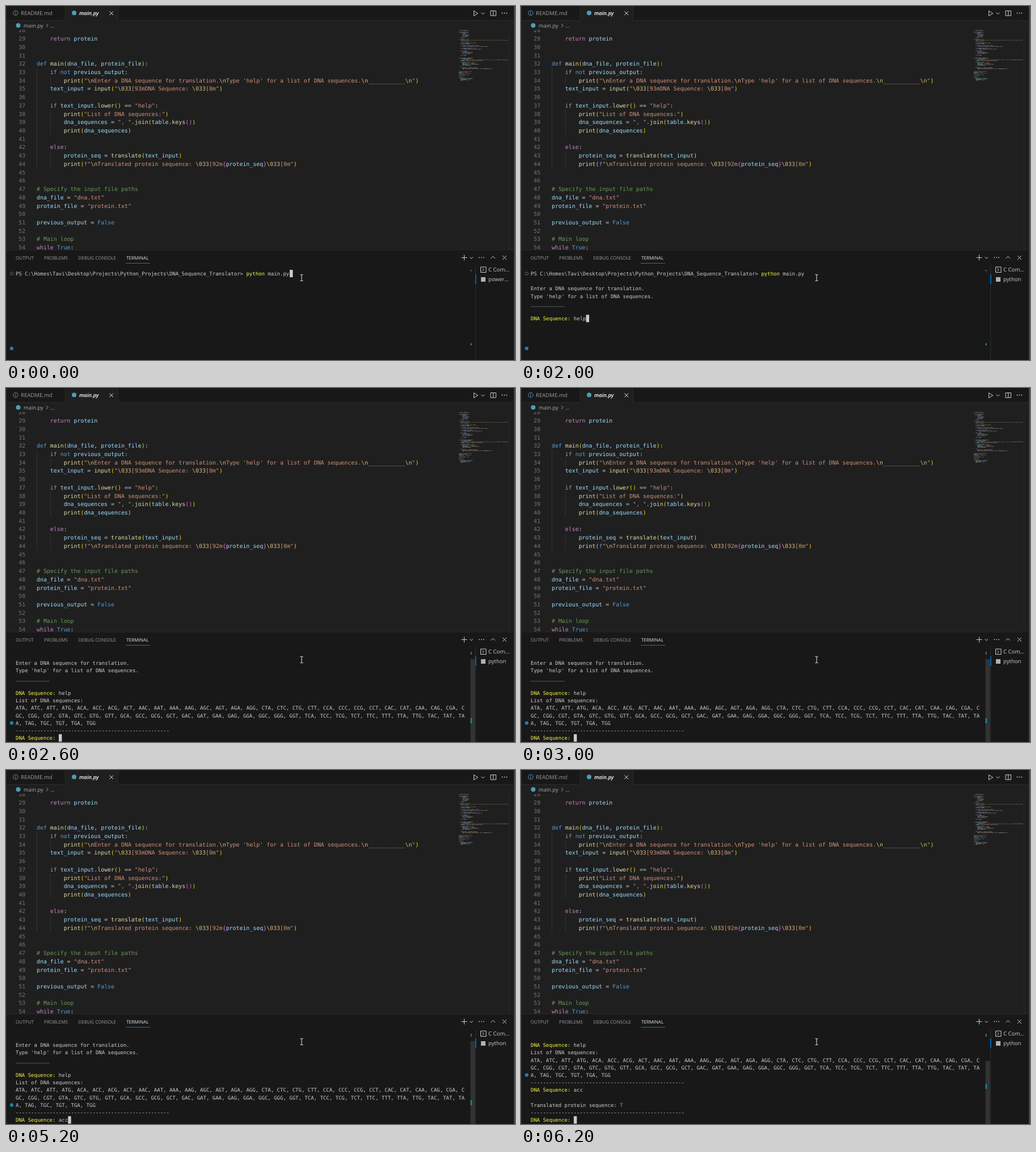
Recreate the animation shown at these times as an HTML page. Size 897 px wide and 624 px high, loop 6.4 s.

```html
<!DOCTYPE html>
<html lang="en">
<head>
<meta charset="utf-8">
<title>DNA translator session</title>
<style>
  html, body { margin: 0; width: 100%; height: 100%; overflow: hidden; background: #1f1f1f; }
  svg { display: block; }
  text { white-space: pre; text-rendering: geometricPrecision; }
  .code { font: 9.906px "DejaVu Sans Mono", monospace; }
  .term { font: 9.014px "DejaVu Sans Mono", monospace; }
  .ui { font: 9.6px "Open Sans", sans-serif; }
  .tab { font: 8.15px "Open Sans", sans-serif; }
  .icon { fill: none; stroke: #cccccc; stroke-width: 1; }
</style>
</head>
<body>
<svg id="stage" width="897" height="624" viewBox="0 0 897 624">
  <defs><clipPath id="editorClip"><rect x="0" y="42" width="887" height="387.5"/></clipPath></defs>
</svg>
<script>
const NS = 'http://www.w3.org/2000/svg';
const stage = document.getElementById('stage');

function add(tag, attrs, parent = stage, content) {
  const node = document.createElementNS(NS, tag);
  for (const key in attrs) node.setAttribute(key, attrs[key]);
  if (content !== undefined) node.textContent = content;
  parent.append(node);
  return node;
}
const rect = (x, y, width, height, fill, parent) => add('rect', { x, y, width, height, fill }, parent);
const dot = (cx, cy, r, fill, parent) => add('circle', { cx, cy, r, fill }, parent);
const icon = (d, extra) => add('path', { d, class: 'icon', ...extra });
const label = (x, y, text, fill, cls = 'ui', extra) =>
  add('text', { x, y, fill, class: cls, ...extra }, stage, text);

function spans(x, y, cls, parts, parent) {
  const line = add('text', { x, y, class: cls }, parent);
  for (const [text, fill] of parts) add('tspan', { fill }, line, text);
}

// Editor code
const FIRST = 28;
const code = String.raw`
    return protein


def main(dna_file, protein_file):
    if not previous_output:
        print("\nEnter a DNA sequence for translation.\nType 'help' for a list of DNA sequences.\n___________\n")
    text_input = input("\033[93mDNA Sequence: \033[0m")

    if text_input.lower() == "help":
        print("List of DNA sequences:")
        dna_sequences = ", ".join(table.keys())
        print(dna_sequences)

    else:
        protein_seq = translate(text_input)
        print(f"\nTranslated protein sequence: \033[92m{protein_seq}\033[0m")


# Specify the input file paths
dna_file = "dna.txt"
protein_file = "protein.txt"

previous_output = False

# Main loop
while True:`.split('\n');

const BRACKETS = ['#ffd700', '#da70d6', '#179fff'];

function lex(line) {
  let inString = false, inBrace = false, depth = 0;
  return [...line.matchAll(/\s+|#.*|\\n|\\\d{3}|\w+|./g)].map(match => {
    const t = match[0], next = line[match.index + t.length];
    const color = () => {
      if (t === '"') { inString = !inString; return '#ce9178'; }
      if (t === '{' || t === '}') { inBrace = t === '{'; return '#da70d6'; }
      if (inString && !inBrace) return t[0] === '\\' ? '#d7ba7d' : '#ce9178';
      if (t[0] === '#') return '#6a9955';
      if (t === '(') return BRACKETS[depth++];
      if (t === ')') return BRACKETS[--depth];
      if (/^(return|if|else|while)$/.test(t)) return '#c586c0';
      if (/^(def|not|True|False)$/.test(t) || (t === 'f' && next === '"')) return '#569cd6';
      if (/^\w/.test(t)) return next === '(' ? '#dcdcaa' : '#9cdcfe';
      return '#cccccc';
    };
    return [t, color()];
  });
}

function drawEditor() {
  rect(0, 0, 897, 624, '#1f1f1f');
  const editor = add('g', { 'clip-path': 'url(#editorClip)' });
  const rowY = n => 61.1 + (n - 29) * 14.72;
  const guide = (x, from, to) => rect(x, rowY(from) - 11, 1, (to - from + 1) * 14.72, '#333333', editor);
  guide(54, 33, 44);
  guide(78, 34, 34);
  guide(78, 38, 40);
  guide(78, 43, 44);
  code.forEach((line, i) => {
    const n = FIRST + i;
    spans(22.3, rowY(n), 'code', [[n, '#6e7681']], editor);
    spans(54, rowY(n), 'code', lex(line), editor);
  });
  rect(886, 42, 1, 388, '#292929');
}

// Overview of the file: each word becomes a thin bar
function drawMinimap() {
  const map = add('g', { opacity: 0.5 });
  const bar = (line, col, len, fill) => {
    const x = 798 + col * 0.78;
    const width = Math.min(len * 0.78 - 0.4, 885.5 - x);
    if (width > 0) rect(x, 42.6 + (line - 1) * 1.57, width, 1, fill, map);
  };
  const head = '0 24||0 22|4 15|8 12|8 16|8 13|8 13|4 9||0 24|4 108|4 20||4 36|4 22||4 42|8 58||4 34|8 44||4 14|8 18|8 25|8 20';
  head.split('|').forEach((entry, i) => {
    if (!entry) return;
    const [indent, len] = entry.split(' ').map(Number);
    const tones = i === 11 ? ['#6a9955'] : ['#c586c0', '#9cdcfe', '#cccccc', '#ce9178'];
    for (let col = 0, k = 0; col < len; k++) {
      const word = Math.min(3 + (i * 5 + k * 3) % 7, len - col);
      bar(i + 1, indent + col, word, tones[k % tones.length]);
      col += word + 1;
    }
  });
  const tail = ['    main(dna_file, protein_file)', '    previous_output = True', '    print("------" * 10)'];
  code.concat(tail).forEach((line, i) => {
    let col = 0;
    for (const [text, fill] of lex(line)) {
      if (text.trim()) bar(FIRST + i, col, text.length, fill);
      col += text.length;
    }
  });
}

function drawTabs() {
  rect(0, 0, 897, 25, '#181818');
  rect(0, 25, 897, 1, '#2b2b2b');
  rect(104, 0, 93, 26, '#1f1f1f');
  rect(104, 0, 1, 25, '#2b2b2b');
  rect(197, 0, 1, 25, '#2b2b2b');

  add('circle', { cx: 17, cy: 12.3, r: 4.2, class: 'icon', style: 'stroke:#519aba' });
  rect(16.5, 11.5, 1, 3.2, '#519aba');
  rect(16.5, 9.6, 1, 1, '#519aba');
  label(26, 16, 'README.md', '#9d9d9d');
  dot(120, 12.3, 4, '#519aba');
  label(129, 16, 'main.py', '#ffffff', 'ui', { style: 'font-style:italic;font-weight:600;font-size:9.4px' });
  icon('M182.5 9.5l6.5 6.5M189 9.5l-6.5 6.5', { style: 'stroke:#e8e8e8' });

  dot(21.5, 34.3, 4, '#519aba');
  label(31, 38, 'main.py', '#a9a9a9', 'ui', { style: 'font-size:9.4px' });
  icon('M71 31.5l3 3l-3 3', { style: 'stroke:#a9a9a9' });
  label(78, 38, '...', '#a9a9a9');

  icon('M824.5 8.5v9l7-4.5z');
  icon('M837.5 11.5l3 3l3-3');
  icon('M854 8.5h9.5v8.5h-9.5zM858.75 8.5v8.5');
  for (const x of [874.5, 878.5, 882.5]) dot(x, 12.5, 0.9, '#cccccc');
}

function drawPanel() {
  rect(0, 429.5, 897, 195, '#181818');
  rect(0, 429.5, 897, 1, '#2b2b2b');
  const tabs = [[17, 'OUTPUT'], [67, 'PROBLEMS'], [127.5, 'DEBUG CONSOLE'], [212, 'TERMINAL']];
  for (const [x, name] of tabs) label(x, 446.6, name, name === 'TERMINAL' ? '#e7e7e7' : '#9d9d9d', 'tab');
  rect(211, 453, 43, 1, '#0078d4');

  icon('M802.5 443.5h10M807.5 438.5v10');
  icon('M817.5 442.5l2.7 2.7l2.7-2.7');
  for (const x of [834, 838, 842]) dot(x, 443.3, 0.9, '#cccccc');
  icon('M854.5 445l3.7-3.7l3.7 3.7');
  icon('M875 440l7 7M882 440l-7 7');

  rect(827, 457, 1, 167, '#2b2b2b');
  rect(827, 473, 1.5, 17, '#0078d4');
  icon('M836.5 460h9.5v9.5h-9.5zM839.5 462.3l2.6 2.5l-2.6 2.5');
  rect(837, 478, 8, 8, '#b0b0b0');
  label(850, 468.3, 'C Com...', '#cccccc');
}

function drawFrame() {
  rect(0, 0, 1, 624, '#2b2b2b');
  rect(894, 0, 1, 624, '#1a1a1a');
  rect(895, 0, 2, 624, '#454545');
}

// Terminal session
const GREY = '#cccccc', YELLOW = '#f5f543', GREEN = '#23d18b';
const CELL = 5.427, ROW = 13.2, COLS = 146, LEFT = 17;
const codons = ('ATA ATC ATT ATG ACA ACC ACG ACT AAC AAT AAA AAG AGC AGT AGA AGG ' +
  'CTA CTC CTG CTT CCA CCC CCG CCT CAC CAT CAA CAG CGA CGC CGG CGT ' +
  'GTA GTC GTG GTT GCA GCC GCG GCT GAC GAT GAA GAG GGA GGC GGG GGT ' +
  'TCA TCC TCG TCT TTC TTT TTA TTG TAC TAT TAA TAG TGC TGT TGA TGG').split(' ').join(', ');

const rule = [['-'.repeat(50), GREY]];
const ask = answer => [['DNA Sequence: ', YELLOW], [answer, GREY]];
const plain = text => [[text, GREY]];

const command = [
  [String.raw`PS C:\Homes\Tavi\Desktop\Projects\Python_Projects\DNA_Sequence_Translator> `, GREY],
  ['python ', YELLOW], ['main.py', GREY]
];
const intro = [
  command, [],
  plain('Enter a DNA sequence for translation.'),
  plain("Type 'help' for a list of DNA sequences."),
  plain('_'.repeat(11)), []
];
const listing = [
  ...intro, ask('help'), plain('List of DNA sequences:'),
  ...[0, 1, 2].map(i => plain(codons.slice(i * COLS, (i + 1) * COLS))),
  rule
];
const result = [
  ...listing, ask('acc'), [],
  [['Translated protein sequence: ', GREY], ['T', GREEN]],
  rule
];

const idle = { scroll: 0, mark: [594.5, 3.5] };
const listed = { scroll: 1, slider: 478, mark: [582, 9] };
const done = { scroll: 5, slider: 513, mark: [553, 9] };
const steps = [
  { at: 0, rows: [command], shell: 'power...', ...idle },
  { at: 200, rows: [...intro, ask('')], shell: 'power...', ...idle },
  { at: 1000, rows: [...intro, ask('')], ...idle },
  { at: 1400, rows: [...intro, ask('he')], ...idle },
  { at: 1800, rows: [...intro, ask('help')], ...idle },
  { at: 2400, rows: listing, cursor: 0, ...idle },
  { at: 2600, rows: [...listing, ask('')], ...listed },
  { at: 5000, rows: [...listing, ask('a')], ...listed },
  { at: 5200, rows: [...listing, ask('acc')], ...listed },
  { at: 5600, rows: [...result, ask('')], ...done }
];

function drawTerminal(step, layer) {
  layer.replaceChildren();
  const { rows, scroll, slider, mark } = step;
  const center = i => 471.6 + (i - scroll) * ROW;

  if (!scroll) add('circle', { cx: 10, cy: 471.5, r: 2.6, fill: 'none', stroke: '#6c6c6c' }, layer);
  dot(10, center(10), 3.2, '#1b81a8', layer);

  if (slider) rect(818.5, slider, 8, 624 - slider, '#333333', layer);
  rect(818.5, 465, 2.5, slider ? 5 : 2.5, '#555555', layer);
  rect(818.5, mark[0], 2.5, mark[1], '#1b81a8', layer);

  const last = rows.length - 1;
  const width = rows[last].reduce((sum, [text]) => sum + text.length, 0);
  const col = step.cursor ?? width;
  rows.forEach((parts, i) => {
    if (i >= scroll) spans(LEFT, center(i) + 3.3, 'term', parts, layer);
  });
  rect(LEFT + col * CELL, center(last) - 6.5, CELL, 13, GREY, layer);
  if (col < width) spans(LEFT, center(last) + 3.3, 'term', [['-', '#181818']], layer);

  add('text', { x: 850, y: 485.3, fill: GREY, class: 'ui' }, layer, step.shell ?? 'python');
}

drawEditor();
drawMinimap();
drawTabs();
drawPanel();
const session = add('g', {});
icon('M518.5 473.5h1.6l.9.7l.9-.7h1.6M521 474v10M518.5 484.5h1.6l.9-.7l.9.7h1.6', { style: 'stroke:#e8e8e8' });
drawFrame();

const LOOP = 6400;
const start = performance.now();
let shown;
function tick() {
  const time = Math.max(0, performance.now() - start) % LOOP;
  const step = steps.findLast(s => s.at <= time);
  if (step !== shown) drawTerminal(shown = step, session);
  requestAnimationFrame(tick);
}
tick();
</script>
</body>
</html>
```
